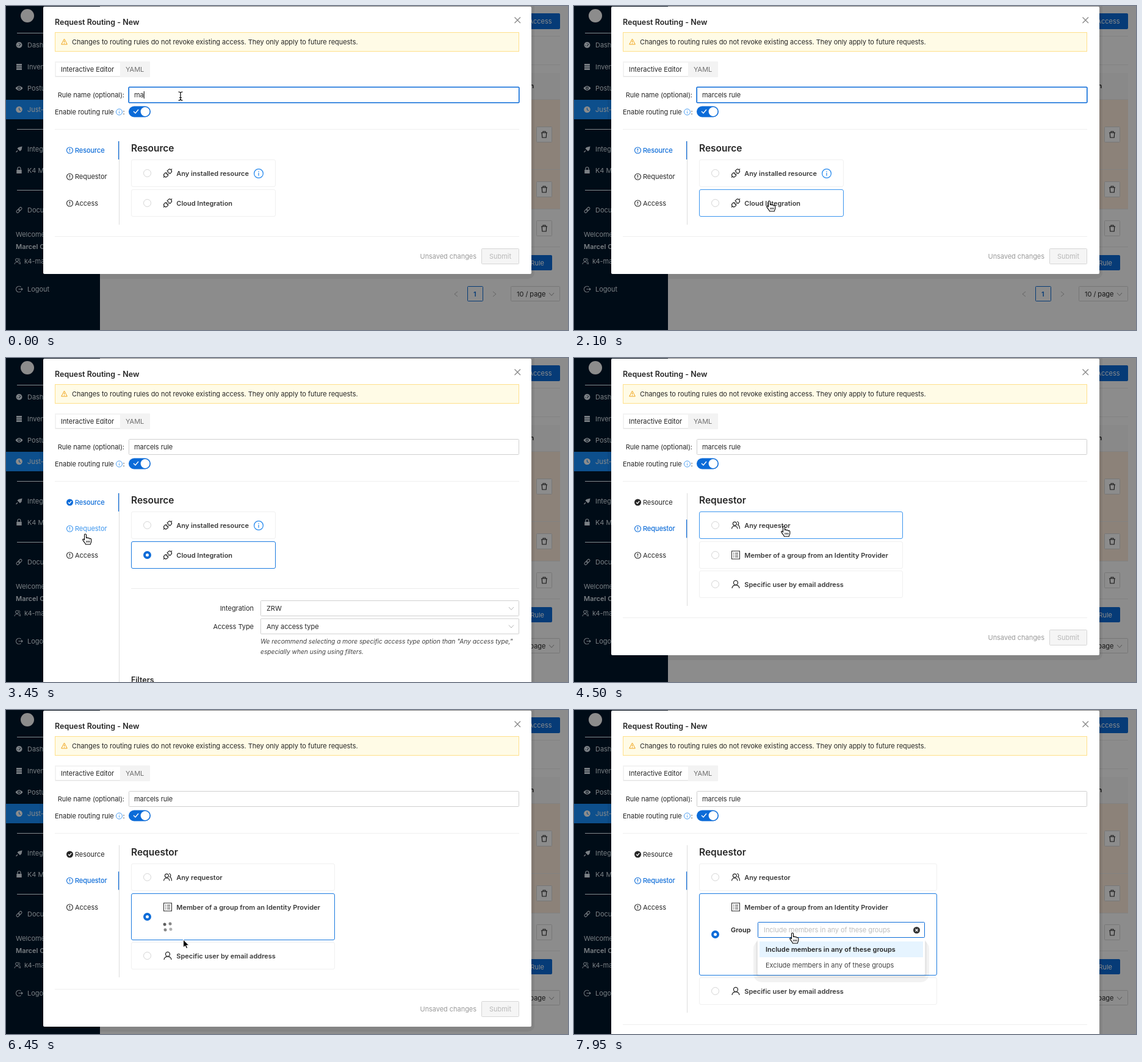
Recreate the animation shown at these times as an HTML page. Size 921 by 532 pixels, loop 8 s.

```html
<!DOCTYPE html>
<html lang="en">
<head>
<meta charset="utf-8">
<title>Request Routing</title>
<style>
html, body { margin: 0; width: 100%; height: 100%; overflow: hidden; background: #8c8c8c; }
svg { display: block; font: 11px Inter, "Open Sans", sans-serif; letter-spacing: -.004em; }
text { white-space: pre; }
</style>
</head>
<body>
<svg id="stage" width="921" height="532" viewBox="0 0 921 532">
  <g id="page"></g>
  <g id="modal"></g>
  <g id="cursor"></g>
</svg>
<script>
const LOOP = 8000, STEP = 150;
const BLUE = '#0b6bd8', LIGHT = '#3b95ee', INK = '#262626';
const PAGE = '#8c8c8c', DIM_BLUE = '#063b77', DIM_ROW = '#0d4f8c';
const byId = id => document.getElementById(id);

// Drawing helpers: text is placed by its vertical middle.
const text = (x, y, s, fill = INK, more = '') =>
  `<text x="${x}" y="${y + 4}" fill="${fill}" ${more}>${s}</text>`;
const bold = (x, y, s, fill = INK, size = 11) =>
  text(x, y, s, fill, `font-weight="600" font-size="${size}" letter-spacing="0"`);
const rect = (x, y, w, h, fill, stroke = 'none', rx = 0, width = 1) =>
  `<rect x="${x}" y="${y}" width="${w}" height="${h}" rx="${rx}" fill="${fill}" stroke="${stroke}" stroke-width="${width}"/>`;
const circle = (x, y, r, fill, stroke = 'none', more = '') =>
  `<circle cx="${x}" cy="${y}" r="${r}" fill="${fill}" stroke="${stroke}" ${more}/>`;
const line = (d, stroke, width = 1, fill = 'none') =>
  `<path d="${d}" fill="${fill}" stroke="${stroke}" stroke-width="${width}"/>`;
const at = (x, y, s, turn = 0) => `<g transform="translate(${x} ${y}) rotate(${turn})">${s}</g>`;
const chevron = (x, y, color) => line(`M${x - 4} ${y - 2}l4 4.5l4-4.5`, color);

// Icons centred on the origin
const plug = at(0, 0,
  line('M-2-3.2H-4.5A3.2 3.2 0 0 0-4.5 3.2H-2ZM2-3.2H4.5A3.2 3.2 0 0 1 4.5 3.2H2ZM-10 0H-7.7M7.7 0H10M-2-1.5H.5M-2 1.5H.5', INK, 1.2), -45);
const person = c => line('M-6 6.5C-5.5-.5 5.5-.5 6 6.5', c, 1.3) + circle(0, -2.6, 3.5, '#fff', c, 'stroke-width="1.3"');
const people = line('M-6.5 6C-6 0 2.5 0 3 6M2-6A3 3 0 0 1 3.5-.5C5.5.5 6.5 3 6.5 6', INK, 1.2)
  + circle(-1.6, -2.4, 3, '#fff', INK, 'stroke-width="1.2"');
const list = rect(-6.5, -6.5, 13, 13, 'none', INK)
  + line('M-4-3h1.5M-4 0h1.5M-4 3h1.5M-1-3h5M-1 0h5M-1 3h5', INK, 1.2);
const info = (x, y, r) => circle(x, y, r, 'none', '#2388ee', `stroke-width="${r / 6}"`)
  + line(`M${x} ${y - r * .12}v${r * .62}M${x} ${y - r * .52}v${r * .2}`, '#2388ee', r / 6);

function sideIcon(kind, x, y, c) {
  const shapes = {
    gauge: circle(0, 0, 5, c) + line('M0 2L2.5-2M-3 1h1M0-3v1', '#000c17'),
    stack: rect(-4.5, -5, 9, 2.8, c) + rect(-4.5, -1.4, 9, 2.8, c) + rect(-4.5, 2.2, 9, 2.8, c),
    eye: line('M-6 0Q0-7.5 6 0Q0 7.5-6 0Z', 'none', 0, c) + circle(0, 0, 2.4, '#000c17') + circle(0, 0, 1.3, c),
    clock: circle(0, 0, 5.3, c) + line('M0-3V.3L2.5 1.8', DIM_ROW, 1.1),
    tool: line('M-5 5L-2.5 2.5', c, 1.3) + line('M-3-1L1.5 3.5L4 1L5-4.5L-1-3Z', 'none', 0, c),
    lock: rect(-4.2, -1, 8.4, 6, c) + line('M-2.5-1V-3A2.5 2.5 0 0 1 2.5-3V-1', c, 1.2),
    link: at(0, 0, rect(-5.5, -2, 6.5, 4, 'none', c, 2) + rect(-1, -2, 6.5, 4, 'none', c, 2), -45),
    user: line('M-4.5 5C-4 0 3 0 3.5 5M2-4.5C5-4 4.5-1 3-.4C4.5.6 5 3 5 5', c) + circle(-.5, -2, 2.4, '#000c17', c),
    exit: line('M3-3.6A4.8 4.8 0 1 0 3 3.6M-1 0H5.5M3.7-1.8L5.5 0L3.7 1.8', c, 1.1)
  };
  return at(x, y, shapes[kind]);
}

function drawPage() {
  const soft = '#7b8085', dark = '#161616', edge = '#777', pale = '#8c8c8c';
  let s = rect(0, 0, 921, 532, PAGE) + rect(0, 0, 154, 532, '#000c17')
    + circle(35, 16, 11, '#8c8c8c') + rect(0, 154, 154, 32, DIM_ROW);
  for (const y of [44.5, 202.5, 302.5]) s += line(`M18 ${y}H136`, '#85898d');
  const menu = [['gauge', 64, 'Dashboard'], ['stack', 100, 'Inventory'], ['eye', 135, 'Posture'],
    ['clock', 170, 'Just-in-time'], ['tool', 235, 'Integrations'], ['lock', 270, 'K4 Management'],
    ['link', 335, 'Documents'], ['exit', 465, 'Logout']];
  for (const [kind, y, label] of menu) {
    const c = kind === 'clock' ? pale : soft;
    s += sideIcon(kind, 21.5, y, c) + text(35, y, label, c);
  }
  s += text(16, 375, 'Welcome', soft) + bold(16, 395, 'Marcel C', soft)
    + sideIcon('user', 18.5, 419, soft) + text(30, 419, 'k4-marcel', soft);

  s += rect(820, 12, 88, 26, DIM_BLUE, 'none', 2) + text(894.5, 25, 'Access', pale, 'text-anchor="end"')
    + rect(820, 409, 75, 25, DIM_BLUE, 'none', 2) + text(882, 422, 'Rule', pale, 'text-anchor="end"')
    + rect(800, 110, 108, 43, '#898989') + bold(858.5, 131, 'n', dark)
    + rect(800, 153, 108, 180, '#8c8279');
  for (const y of [49.5, 96.5, 153.5, 268.5, 333.5, 395.5]) s += line(`M800 ${y}H908`, '#828282');
  for (const y of [211, 301, 365])
    s += rect(869.5, y - 12.5, 25, 25, PAGE, edge, 1)
      + at(882, y, line('M-5-3H5M-2-3V-5H2V-3M-3.8-3L-3.2 5H3.2L3.8-3', dark, 1.1));
  s += line('M740 469l-5 4l5 4', '#666') + line('M798 469l5 4l-5 4', '#666')
    + rect(756.5, 460.5, 25, 24, PAGE, DIM_BLUE, 1) + bold(766, 473, '1', DIM_BLUE)
    + rect(827.5, 460.5, 80, 24, PAGE, edge, 1) + text(837, 473, '10 / page', dark)
    + chevron(894, 473, '#555');
  return s;
}

// Times of the clicks
const PICK_CLOUD = 2250, OPEN_TAB = 3750, PICK_ANY = 4650, PICK_GROUP = 5700, LOADED = 7350, DROPDOWN = 7800;

// Pointer route: time, x, y
const ROUTE = [[0, 286, 148], [1350, 286, 148], [1950, 320, 318], [2100, 320, 320], [2400, 322, 322],
  [2850, 430, 400], [3450, 130, 289], [3750, 131, 289], [4350, 342, 278], [4500, 344, 276],
  [4650, 344, 276], [4950, 511, 404], [5250, 513.5, 401], [5700, 400, 326], [6150, 296, 374],
  [6450, 290.5, 377], [6750, 320, 379], [7200, 376, 378], [7650, 358, 366], [8000, 358, 366]];

function pointer(t) {
  const i = ROUTE.findIndex(p => p[0] > t), [t0, x0, y0] = ROUTE[i - 1], [t1, x1, y1] = ROUTE[i];
  const k = (1 - Math.cos(Math.PI * (t - t0) / (t1 - t0))) / 2;
  return { x: x0 + (x1 - x0) * k, y: y0 + (y1 - y0) * k };
}
const inside = (p, x, y, w, h) => p.x >= x && p.x < x + w && p.y >= y && p.y < y + h;

function typed(t) {
  const stops = [[0, 2], [150, 3], [300, 5], [450, 7], [600, 9], [900, 10], [1200, 12]];
  return 'marcels rule'.slice(0, stops.filter(s => s[0] <= t).pop()[1]);
}

function card(y, w, h, icon, label, on, hot, radioY = y + 22) {
  return rect(205.5, y, w, h, '#fff', on ? '#1a7ae0' : hot ? LIGHT : '#f0f0f0', 2.5)
    + (on ? circle(231.5, radioY, 6.5, BLUE) + circle(231.5, radioY, 2.5, '#fff')
          : circle(231.5, radioY, 6, '#fff', '#d4d4d4'))
    + at(265, y + 22, icon) + bold(279.3, y + 22, label, '#3a3a3a');
}

function tab(y, label, active, done, hot) {
  const c = active ? BLUE : hot ? LIGHT : INK;
  const mark = done
    ? circle(104.5, y, 5.5, c) + line(`M102 ${y}l2 2l3.2-4`, '#fff', 1.3)
    : circle(104.5, y, 5, 'none', c, 'stroke-width="1.1"') + line(`M104.5 ${y - 3}v3.6M104.5 ${y + 1.6}v1.2`, c, 1.2);
  return mark + text(113, y, label, c, active ? 'stroke="' + c + '" stroke-width=".15"' : '')
    + (active ? rect(184, y - 15, 1.2, 30, BLUE) : '');
}

function spinner(t) {
  const turn = 39 + (t - 6450) * .3;
  let s = '';
  for (let i = 0; i < 4; i++) {
    const phase = Math.abs(((t - 6450) / 1000 + i * .4 + 5.2) % 2 - 1);
    s += circle(4.5, 4.5, 2.5, '#555', 'none', `opacity="${.35 + .6 * phase}" transform="rotate(${i * 90})"`);
  }
  return at(265, 356, s, turn - 45);
}

function dropdown() {
  return rect(294, 378, 288, 69, 'rgba(0,0,0,.05)', 'none', 14)
    + rect(298, 377, 280, 62, 'rgba(0,0,0,.05)', 'none', 6)
    + rect(301, 376, 274, 59, '#fff', 'none', 2) + rect(304, 380, 268, 26, '#e6f4ff')
    + bold(314, 393, 'Include members in any of these groups')
    + text(314, 419, 'Exclude members in any of these groups', '#444');
}

function select(y, label, value, hot) {
  return text(406, y, label, INK, 'text-anchor="end"')
    + rect(417.5, y - 12.5, 423, 25, '#fff', hot ? LIGHT : '#cfcfcf', 1)
    + text(427, y, value) + chevron(828, y, '#b5b5b5');
}

function resourcePanel(t, p) {
  const on = t >= PICK_CLOUD;
  let s = bold(205, 234.5, 'Resource', INK, 15.5)
    + card(252.5, 236, 44, plug, 'Any installed resource', false, inside(p, 205, 252, 237, 45)) + info(414, 275, 7.4)
    + card(301.5, 236, 44, plug, 'Cloud Integration', on, inside(p, 205, 301, 237, 45));
  if (on) {
    const italic = 'font-style="italic" font-size="10.3"';
    s += line('M205 378.5H841', '#ececec')
      + select(411, 'Integration', 'ZRW', inside(p, 417, 396, 424, 28))
      + select(440.5, 'Access Type', 'Any access type', false)
      + text(417, 465, 'We recommend selecting a more specific access type option than "Any access type,"', '#444', italic)
      + text(417, 482, 'especially when using using filters.', '#444', italic)
      + bold(205, 529, 'Filters', INK, 12.5);
  }
  return s;
}

function requestorPanel(t, p) {
  const any = t >= PICK_ANY && t < PICK_GROUP, group = t >= PICK_GROUP, loaded = t >= LOADED;
  const w = loaded ? 389 : 333, h = loaded ? 134 : group ? 76 : 44;
  let s = bold(205, 234.5, 'Requestor', INK, 15.5)
    + card(252.5, w, 44, people, 'Any requestor', any, inside(p, 205, 252, w, 45))
    + card(301.5, w, h, list, 'Member of a group from an Identity Provider', group,
        inside(p, 205, 301, w, h), 301.5 + h / 2)
    + card(305.5 + h, w, 44, person(INK), 'Specific user by email address', false,
        inside(p, 205, 305 + h, w, 45));
  if (group && !loaded) s += spinner(t);
  if (loaded) {
    const open = t >= DROPDOWN, hot = inside(p, 301, 348, 274, 26);
    s += bold(257, 361, 'Group') + rect(301.5, 348.5, 273, 25, '#fff', open ? BLUE : hot ? LIGHT : '#cfcfcf', 1)
      + text(311, 361, 'Include members in any of these groups', open ? '#bdbdbd' : INK)
      + (hot ? circle(561.5, 361.5, 5.5, '#333') + line('M559.5 359.5l4 4m0-4l-4 4', '#fff', 1.2) : chevron(562, 361, '#b5b5b5'))
      + (open ? dropdown() : '');
  }
  return s;
}

function bottomEdge(t) {
  if (t < PICK_CLOUD) return 440;
  if (t < OPEN_TAB) return 720;
  if (t < PICK_GROUP) return 488;
  return t < LOADED ? 520 : 578;
}

function drawModal(t, p) {
  const end = bottomEdge(t), first = t < OPEN_TAB, focus = t < PICK_CLOUD;
  let s = rect(55, -10, 811, end + 18, 'rgba(0,0,0,.06)', 'none', 10)
    + rect(61, 1, 800, end - 1, '#fff', 'none', 2)
    + bold(80, 27, 'Request Routing - New', INK, 12.5)
    + line('M833.5 18.5l9.5 9.5m0-9.5l-9.5 9.5', '#858585', 1.2)
    + rect(80.5, 43.5, 760, 31, '#fffbe6', '#ffe08a')
    + line('M95.5 54L100.3 63H90.7ZM95.5 57v3M95.5 61v1', '#f0a51c')
    + text(108, 59, 'Changes to routing rules do not revoke existing access. They only apply to future requests.')
    + rect(80, 91, 156, 26, '#f3f3f3', 'none', 1) + rect(81, 94, 106, 22, '#e4e4e4', 'none', 1)
    + rect(81.5, 93, 105.5, 22, '#fff', 'none', 1)
    + text(90, 104, 'Interactive Editor') + text(196, 104, 'YAML', '#6e6e6e')
    + text(194, 146, 'Rule name (optional):', INK, 'text-anchor="end"')
    + (focus ? rect(201.2, 133.2, 639.6, 25.6, '#fff', BLUE, 1, 1.6) : rect(201.5, 133.5, 639, 25, '#fff', '#cfcfcf', 1))
    + text(210, 146, typed(t), INK, 'id="name"')
    + text(80, 174, 'Enable routing rule') + info(185.5, 174, 5) + text(191.5, 174, ':')
    + rect(201, 164.6, 36, 17.8, BLUE, 'none', 8.9) + circle(228, 173.5, 7.4, '#fff')
    + line('M209 173l3 3l5-6', '#fff', 1.3)
    + line('M80 202.5H841', '#efefef') + line(`M185.5 222V${end - 81}`, '#dcdcdc')
    + tab(237, 'Resource', first, t >= PICK_CLOUD, inside(p, 99, 222, 86, 30))
    + tab(280.3, 'Requestor', !first, t >= PICK_ANY && t < PICK_GROUP, inside(p, 99, 266, 86, 30))
    + tab(324, 'Access', false, false, inside(p, 99, 309, 86, 30))
    + line(`M80 ${end - 61.5}H841`, '#efefef')
    + text(771, end - 29, 'Unsaved changes', '#9a9a9a', 'text-anchor="end"')
    + rect(779.5, end - 41.5, 61, 25, '#f5f5f5', '#d6d6d6', 1)
    + text(810, end - 29, 'Submit', '#b8b8b8', 'text-anchor="middle"');
  return s + (first ? resourcePanel(t, p) : requestorPanel(t, p));
}

function drawCursor(t, p) {
  if (inside(p, 201, 133, 640, 26))
    return at(p.x, p.y, line('M-3.5-7Q0-7 0-5V5Q0 7-3.5 7M3.5-7Q0-7 0-5M0 5Q0 7 3.5 7M-2 2.5H2', '#000', 1.2));
  const first = t < OPEN_TAB, w = first ? 237 : t < LOADED ? 334 : 390;
  const cards = inside(p, 205, 252, w, first ? 94 : t < PICK_GROUP ? 142 : t < LOADED ? 124 : 183);
  const field = first && t >= PICK_CLOUD && inside(p, 417, 396, 424, 28);
  if (cards || field || inside(p, 99, 222, 86, 117))
    return at(p.x, p.y, line('M-1.5 1.5C-1.5-.5 1.5-.5 1.5 1.5V7C1.8 5.5 4.3 5.5 4.4 7.3C5 6 7 6.2 7.2 8C8 7 9.8 7.5 9.8 9V12C9.8 14 8.5 15 8.3 17H.5C0 15-2.5 13-4 10C-5 8.5-3.2 7.5-1.5 9.5Z', '#000', 1.1, '#fff')
      + line('M2 11v3M4.4 11v3M6.8 11v3', '#000'));
  return at(p.x, p.y, line('M0 0V13L3 10.2L5 14.5L7.2 13.5L5.2 9.4H9.3Z', '#fff', 1, '#000'));
}

let shown = -1;
function frame(now) {
  const t = Math.floor(now % LOOP / STEP) * STEP;
  if (t !== shown) {
    shown = t;
    const p = pointer(t);
    byId('modal').innerHTML = drawModal(t, p);
    if (t < 1650) {
      const x = 210.5 + byId('name').getComputedTextLength();
      byId('modal').innerHTML += line(`M${x} 140V152`, '#000');
    }
    byId('cursor').innerHTML = drawCursor(t, p);
  }
  requestAnimationFrame(frame);
}

byId('page').innerHTML = drawPage();
frame(0);
</script>
</body>
</html>
```
